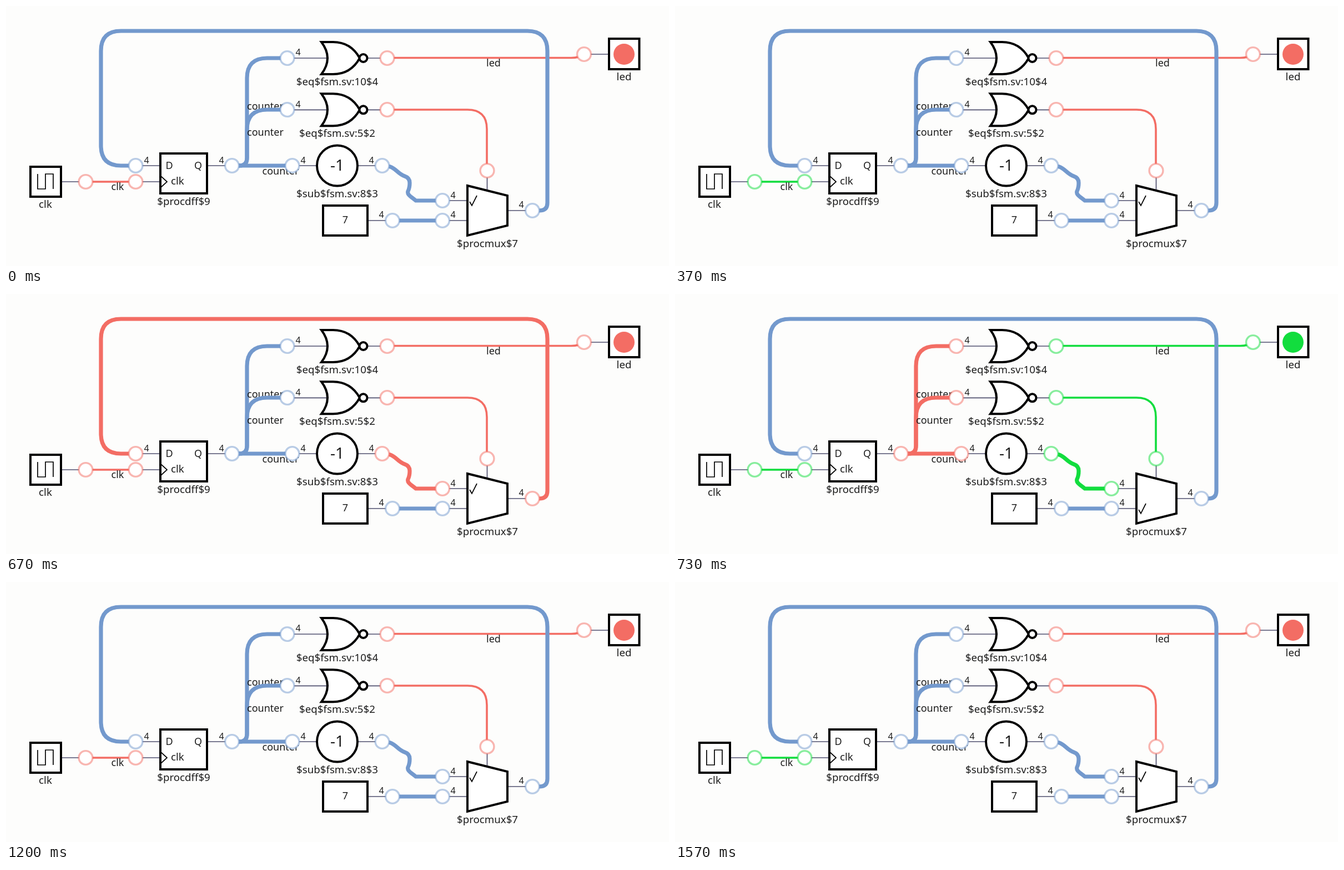
Animation, 1194 px wide and 469 px high, one loop 1610 ms. Source, as an HTML page:

```html
<!DOCTYPE html>
<html lang="en">
<head>
<meta charset="utf-8">
<title>Counter circuit</title>
<style>
  :root { --low: #f36d64; --high: #12dd3e; --bus: #7399cd; }
  html, body { margin: 0; width: 100%; height: 100%; overflow: hidden; background: #fdfdfc; }
  svg { display: block; width: 1194px; height: 469px; }
  text { font: 18.7px "Noto Sans", "Open Sans", sans-serif; fill: #1c1c1c; }
  .mid { text-anchor: middle; }
  .net { font-size: 18px; }
  .bits text { font-size: 16px; }
  .body { fill: #fff; stroke: #000; stroke-width: 4; }
  .thin { fill: none; stroke: #000; stroke-width: 1.7; }
  .stub { fill: none; stroke: #50506f; stroke-width: 1.7; }
  .wire { fill: none; stroke: currentColor; stroke-width: 3.6; }
  .wide { stroke-width: 7.2; }
  .port { fill: #fff; stroke: currentColor; stroke-opacity: .5; stroke-width: 3.4; }

  /* Signal colours switch hard, all on one 1610 ms cycle. */
  .clk, .count, .sub, .eq, .next, .upper, .lower { animation: 1610ms step-end infinite; }
  .clk { animation-name: clk; }
  .count { animation-name: count; }
  .sub { animation-name: sub; }
  .eq { animation-name: eq; }
  .next { animation-name: next; }
  .upper { animation-name: upper; }
  .lower { animation-name: lower; }
  .const { color: var(--bus); }
  @keyframes clk {
    0%, 12.4%, 24.8%, 37.2%, 49.6%, 62.05%, 74.5%, 86.9% { color: var(--low); }
    6.2%, 18.6%, 31%, 43.4%, 55.85%, 68.3%, 80.7%, 93.1%, 100% { color: var(--high); }
  }
  @keyframes count {
    0%, 57.7%, 100% { color: var(--bus); }
    43.4% { color: var(--low); }
  }
  @keyframes sub {
    0%, 60.2%, 100% { color: var(--bus); }
    31% { color: var(--low); }
    43.4% { color: var(--high); }
  }
  @keyframes eq {
    0%, 60.2%, 100% { color: var(--low); }
    43.4% { color: var(--high); }
  }
  @keyframes next {
    0%, 43.4%, 100% { color: var(--bus); }
    31% { color: var(--low); }
  }
  @keyframes upper {
    0%, 60.2%, 100% { visibility: visible; }
    43.4% { visibility: hidden; }
  }
  @keyframes lower {
    0%, 60.2%, 100% { visibility: hidden; }
    43.4% { visibility: visible; }
  }
</style>
</head>
<body>
<svg viewBox="0 0 1194 469">
  <defs>
    <circle id="port" class="port" r="12.4"/>
    <g id="nor">
      <path class="stub" d="M519 94H580M650 94H674"/>
      <path class="body" d="M568 65H589C612 65 627 76 637 94C627 112 612 123 589 123H568Q590 94 568 65Z"/>
      <circle class="body" cx="643.5" cy="94" r="7"/>
    </g>
    <path id="tick" class="thin" d="M835 353L839 360L848 342"/>
  </defs>

  <!-- components -->
  <path class="stub" d="M99 317H132M245 317H278M245 288H278M362 288H395M528 288H560M633 288H665M651 387H684M798 351H831M798 387H831M903 369H936M866.5 309V334M1053 87H1086"/>
  <use href="#nor"/>
  <use href="#nor" y="93.3"/>
  <rect class="body" x="44" y="290" width="55" height="54"/>
  <path class="thin" d="M57 303V330H71V303H85V330"/>
  <rect class="body" x="278" y="266" width="84" height="72"/>
  <path class="thin" d="M279 307L290 317L279 327"/>
  <circle class="body" cx="596.5" cy="288" r="36.5"/>
  <rect class="body" x="571" y="360" width="80" height="54"/>
  <path class="body" d="M831 324L903 342V396L831 414Z"/>
  <use class="upper" href="#tick"/>
  <use class="lower" href="#tick" y="36"/>
  <rect class="body" x="1086" y="59" width="54.500" height="55"/>
  <circle class="eq" cx="1113" cy="87" r="19" fill="currentColor"/>

  <!-- component text -->
  <g class="mid">
    <text x="71" y="364">clk</text>
    <text x="320" y="359">$procdff$9</text>
    <text x="596.5" y="143">$eq$fsm.sv:10$4</text>
    <text x="596.5" y="236">$eq$fsm.sv:5$2</text>
    <text x="596.5" y="345">$sub$fsm.sv:8$3</text>
    <text x="867" y="435">$procmux$7</text>
    <text x="1113" y="134">led</text>
    <text x="596.5" y="297" style="font-size:28px">-1</text>
    <text x="611" y="392" class="net">7</text>
    <text x="294" y="294" class="net">D</text>
    <text x="346" y="294" class="net">Q</text>
  </g>
  <text x="297" y="322">clk</text>
  <g class="bits mid">
    <text x="526" y="89">4</text>
    <text x="526" y="183">4</text>
    <text x="253" y="284">4</text>
    <text x="388" y="284">4</text>
    <text x="535" y="284">4</text>
    <text x="658" y="284">4</text>
    <text x="805" y="347">4</text>
    <text x="805" y="382">4</text>
    <text x="676" y="382">4</text>
    <text x="928" y="364">4</text>
  </g>

  <!-- nets -->
  <g class="eq">
    <path class="wire" d="M686 93.500H1018Q1032 93.500 1041 87"/>
    <path class="wire" d="M686 187H831Q866 187 866 222V297"/>
    <text class="net mid" x="878" y="108.500">led</text>
    <use href="#port" x="686.500" y="94"/>
    <use href="#port" x="1041" y="87"/>
    <use href="#port" x="686.500" y="187"/>
    <use href="#port" x="866.500" y="297"/>
  </g>
  <g class="clk">
    <path class="wire" d="M144 317H233"/>
    <text class="net mid" x="201" y="332">clk</text>
    <use href="#port" x="143.500" y="317"/>
    <use href="#port" x="233.500" y="317"/>
  </g>
  <g class="count">
    <path class="wire wide" d="M407 288H421Q434 288 434 274V130Q434 94 470 94H506"/>
    <text class="net" x="434" y="187">counter</text>
    <path class="wire wide" d="M407 288H421Q434 288 434 274V223Q434 187 470 187H506"/>
    <text class="net" x="434" y="234">counter</text>
    <text class="net" x="461.500" y="303.500">counter</text>
    <path class="wire wide" d="M407 288H516"/>
    <use href="#port" x="506.500" y="94"/>
    <use href="#port" x="506.500" y="187"/>
    <use href="#port" x="515.500" y="288"/>
    <use href="#port" x="407" y="288"/>
  </g>
  <g class="sub">
    <path class="wire wide" d="M677 288C690 288 695 290 703 297Q712 305 718 307Q727 310 727 319Q727 328 724 334C722 340 728 343 738 351H786"/>
    <use href="#port" x="677.500" y="288"/>
    <use href="#port" x="786" y="351"/>
  </g>
  <g class="const">
    <path class="wire wide" d="M696 387H786"/>
    <use href="#port" x="696" y="387"/>
    <use href="#port" x="786" y="387"/>
  </g>
  <g class="next">
    <path class="wire wide" d="M948 369H961Q975 369 975 355V81Q975 45 939 45H207Q171 45 171 81V252Q171 288 207 288H233"/>
    <use href="#port" x="948" y="369"/>
    <use href="#port" x="233.500" y="288"/>
  </g>
</svg>
</body>
</html>
```
